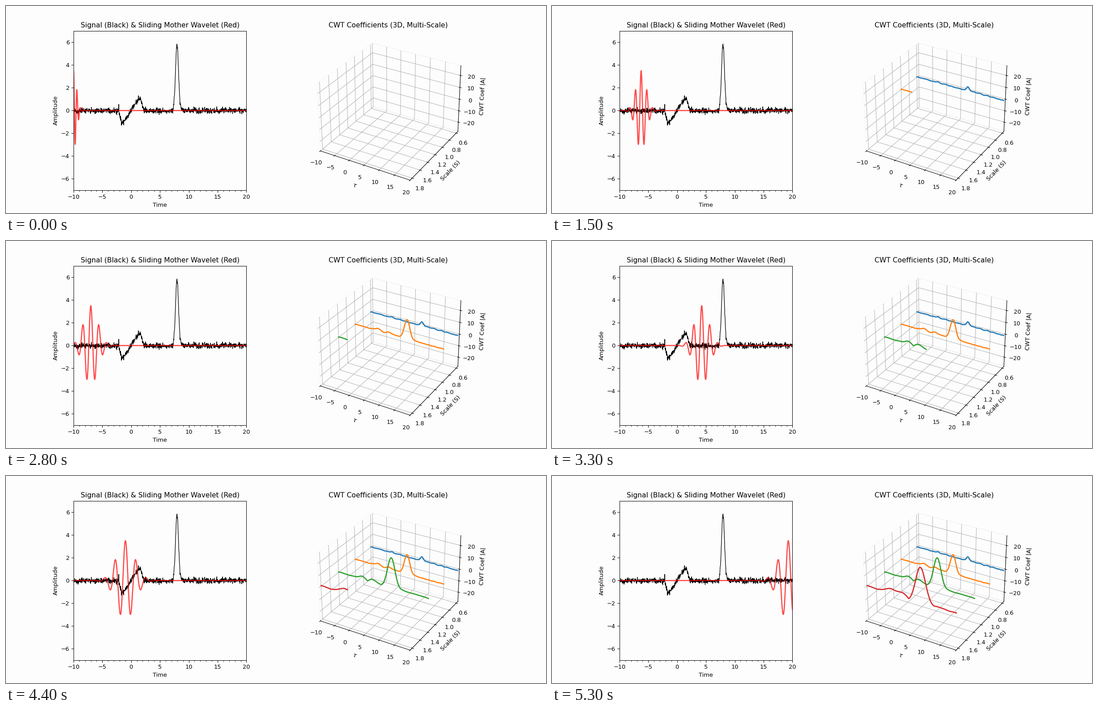
These frames come from a looping animation (1207x464 px, 5400 ms). A matplotlib script:

```python
import numpy as np
import matplotlib.pyplot as plt
from matplotlib.animation import FuncAnimation
from matplotlib.ticker import MultipleLocator

W, H, DPI = 1207, 464, 92.85
N, STEP, FRAMES = 1000, 75, 54
SCALES = (0.6, 1.0, 1.4, 1.8)
PAPER = "#fdfdfd"

plt.rcParams["font.family"] = "DejaVu Sans"


def morlet(x):
    """Complex Morlet wavelet, bandwidth 1.5, centre frequency 1."""
    return np.exp(-x**2 / 1.5 + 2j * np.pi * x) / np.sqrt(1.5 * np.pi)


def make_signal(t):
    rng = np.random.default_rng(7)
    ramp = 0.83 * t * np.exp(-(t / 1.9) ** 8)
    spike = 5.8 * np.exp(-((t - 7.96) / 0.37) ** 2)
    y = ramp + spike + np.clip(rng.normal(0, 0.13, t.size), -0.38, 0.38)
    y[np.searchsorted(t, -2.17)] = 0.55
    return y


def cwt_modulus(t, y, s):
    shift = (t[None, :] - t[:, None]) / s
    return np.abs(np.conj(morlet(shift)) @ y) / np.sqrt(s)


t = np.linspace(-10, 20, N)
signal = make_signal(t)
coefs = [cwt_modulus(t, signal, s) for s in SCALES]
top = max(c.max() for c in coefs)

# The small surplus keeps the pixel size from rounding down.
fig = plt.figure(figsize=((W + 0.01) / DPI, (H + 0.01) / DPI), dpi=DPI,
                 facecolor=PAPER)
grid = fig.add_gridspec(1, 2, width_ratios=[1, 1.2])

ax = fig.add_subplot(grid[0], facecolor=PAPER)
ax.set(xlim=(-10, 20), ylim=(-7, 7), xlabel="Time", ylabel="Amplitude",
       title="Signal (Black) & Sliding Mother Wavelet (Red)")
ax.xaxis.set_major_locator(MultipleLocator(5))
ax.xaxis.set_minor_locator(MultipleLocator(1))
ax.plot(t, signal, color="black", lw=1)
wave, = ax.plot([], [], color="red", lw=2, alpha=0.7)

ax3 = fig.add_subplot(grid[1], projection="3d", facecolor=PAPER)
ax3.view_init(elev=30, azim=-60)
ax3.set_xlim(-10, 20)
ax3.set_ylim(SCALES[-1] + 0.05, SCALES[0] - 0.05)
ax3.set_zlim(-top, top)
ax3.set_xticks(range(-10, 21, 5))
ax3.set_yticks(np.arange(6, 19, 2) / 10)
ax3.set_zticks(range(-20, 21, 10))
ax3.set_xlabel(r"$\tau$")
ax3.set_ylabel("Scale (S)")
ax3.set_zlabel("CWT Coef |A|")
ax3.set_title("CWT Coefficients (3D, Multi-Scale)")
for axis in (ax3.xaxis, ax3.yaxis, ax3.zaxis):
    axis.pane.fill = False
curves = [ax3.plot([], [], [], color=f"C{i}", lw=2)[0]
          for i in range(len(SCALES))]


def update(frame):
    row, col = divmod(frame * STEP, N)
    shape = morlet((t - t[col]) / SCALES[row]).real
    wave.set_data(t, 3.5 * shape / morlet(0).real)
    for i, (curve, s, c) in enumerate(zip(curves, SCALES, coefs)):
        n = N if i < row else col + 1 if i == row else 0
        curve.set_data_3d(t[:n], np.full(n, s), c[:n])
    return [wave, *curves]


anim = FuncAnimation(fig, update, frames=FRAMES, interval=100,
                     init_func=lambda: update(0), repeat=True, blit=False)
plt.show()
```
